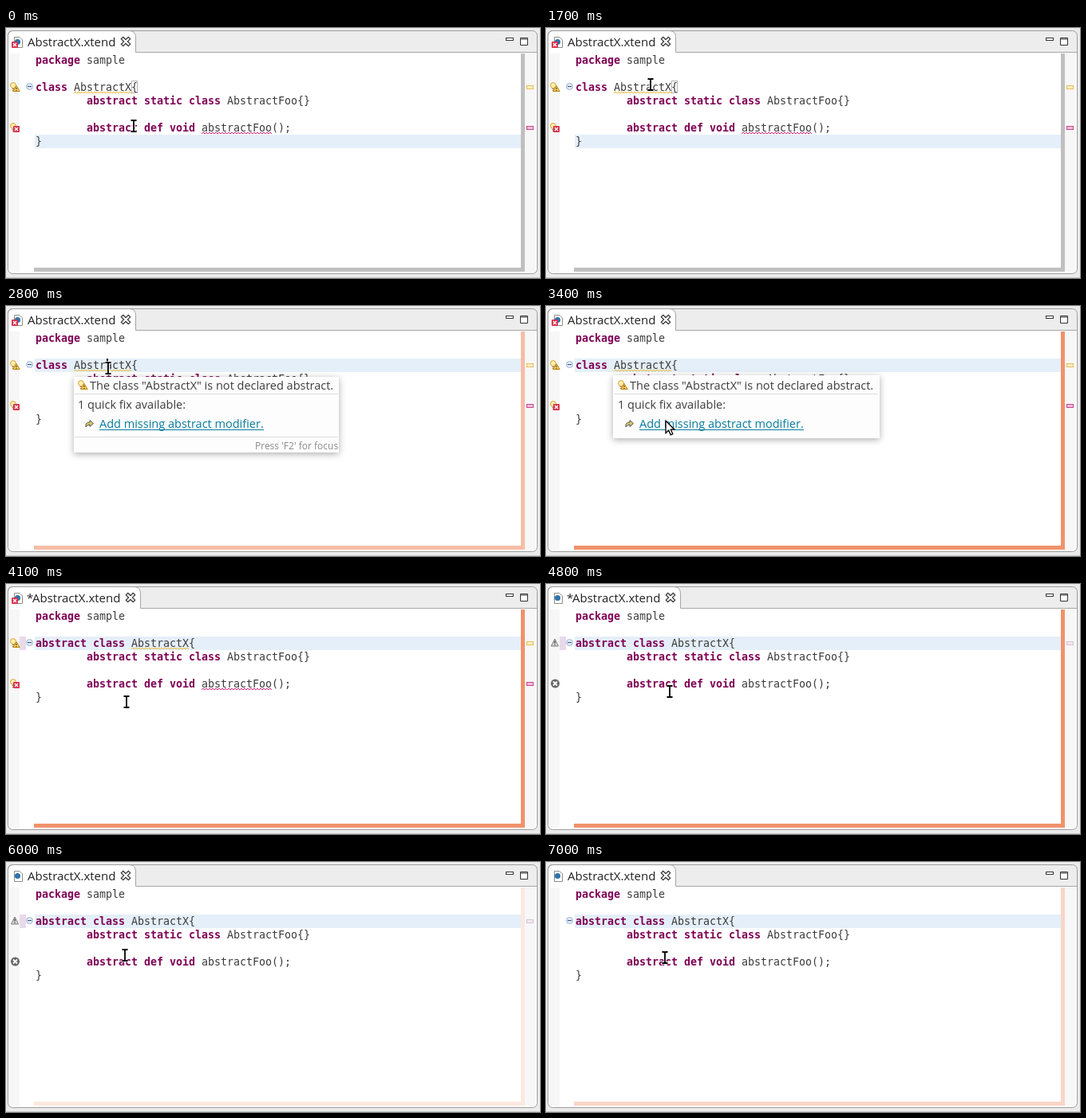
Write an HTML page that moves like this. It is 669 px wide and 314 px high and loops after 7100 ms.

```html
<!DOCTYPE html>
<html lang="en">
<head>
<meta charset="utf-8">
<title>Quick fix in an editor</title>
<style>
  html, body { margin: 0; width: 100%; height: 100%; overflow: hidden; background: #ebebeb; }
  svg { display: block; }
  text { white-space: pre; }
  .code { font: 13.29px "DejaVu Sans Mono", monospace; fill: #3c3c3c; }
  .key { font-weight: bold; fill: #7f0055; }
  .ui { font: 14.5px "Open Sans", "Noto Sans", sans-serif; fill: #3c3c3c; }
  .tab { font-size: 15px; fill: #222; }
  .foot { font-size: 12px; fill: #8a8a8a; }
  .link { fill: #077a9e; }
  .panel { fill: #fdfdfd; filter: drop-shadow(0 2px 4px rgba(0,0,0,.32)); }
</style>
</head>
<body>
<svg width="669" height="314" viewBox="0 0 669 314">
  <defs>
    <g id="bulb">
      <circle cx="4" cy="4" r="3.4" fill="#fff1b0" stroke="#d9a23c"/>
      <path d="M2.5 8.5h3M3 10.5h2" stroke="#8a7a52"/>
    </g>
    <g id="warnMark">
      <path d="M8 4.5L12.2 11.5H3.8Z" fill="#fbd04e" stroke="#b98218" stroke-linejoin="round"/>
      <path d="M8 6.8v2.2M8 10v1" stroke="#333"/>
    </g>
    <g id="errMark">
      <rect width="8" height="8" rx="1" fill="#d8304a"/>
      <path d="M2 2l4 4M6 2l-4 4" stroke="#fff" stroke-width="1.4"/>
    </g>
    <g id="warnBulb"><use href="#bulb"/><use href="#warnMark"/></g>
    <path id="ibeamPath" d="M-3.5-7H-1Q0-7 0-6Q0-7 1-7H3.5M0-6.5V6.5M-3.5 7H-1Q0 7 0 6Q0 7 1 7H3.5"/>
    <path id="crossPath" d="M-3.3-3.3L3.3 3.3M3.3-3.3L-3.3 3.3"/>
  </defs>

  <!-- window frame -->
  <path d="M0 313.5H669" stroke="#c9c9c9"/>
  <rect x="2.5" y="3.5" width="663" height="305" rx="6" fill="#ededed"/>
  <path d="M3 31H665V303Q665 308 660 308H8Q3 308 3 303Z" fill="#fff"/>
  <path id="tabShape" fill="#fff" stroke="#a5a5a5"/>
  <rect x="2.5" y="3.5" width="663" height="305" rx="6" fill="none" stroke="#9d9d9d"/>
  <path d="M5 32H17V306H8Q5 306 5 303Z" fill="#f7f7f7"/>
  <rect x="650" y="32" width="13" height="274" fill="#f7f7f7"/>
  <rect x="626.5" y="12.5" width="9" height="3" fill="#fff" stroke="#333"/>
  <path d="M644.5 12.5h9v9h-9zM644.5 14h9" fill="#fff" stroke="#333"/>

  <!-- tab -->
  <path d="M10.5 11.5H17L20.5 15V24.5H10.5Z" fill="#fff" stroke="#8d8d80"/>
  <circle cx="14.5" cy="17.5" r="3.6" fill="#2f74ab"/>
  <use id="tabErr" href="#errMark" x="7" y="17"/>
  <text id="star" class="ui tab" x="26" y="23">*</text>
  <text id="tabName" class="ui tab" y="23">AbstractX.xtend</text>
  <g id="close">
    <use href="#crossPath" stroke="#333" stroke-width="4.6" stroke-linecap="square"/>
    <use href="#crossPath" stroke="#fff" stroke-width="2.2" stroke-linecap="square"/>
  </g>

  <!-- editor -->
  <rect id="line" x="36" width="609" height="17" fill="#e5eff9"/>
  <rect id="diff" x="17" y="66" width="8" height="17" fill="#e8daea"/>
  <circle cx="29.5" cy="73.5" r="4" fill="#e1ebf6" stroke="#9db4d3"/>
  <path d="M27 73.5h5" stroke="#35527d"/>
  <g id="code"></g>
  <rect id="bracket" x="157.5" y="66.5" width="7" height="15" fill="none" stroke="#b5b5b5"/>
  <path id="warnWave" fill="none" stroke="#e9b93c"/>
  <path id="errWave" fill="none" stroke="#d9267a"/>
  <rect id="caret" y="66" width="2" height="17" fill="#000"/>

  <!-- rulers -->
  <g id="liveMarks">
    <use href="#warnBulb" x="5" y="68"/>
    <use href="#bulb" x="5" y="119"/>
    <use href="#errMark" x="9" y="123"/>
    <rect x="652.5" y="72.5" width="8" height="4" fill="#fdefbd" stroke="#e6bd5a"/>
    <rect x="652.5" y="123.5" width="8" height="4" fill="#f6b9da" stroke="#c94890"/>
  </g>
  <g id="staleMarks">
    <path d="M11 69L15.5 78H6.5Z" fill="#ddd" stroke="#777" stroke-linejoin="round"/>
    <path d="M11 71.5v3M11 75.5v1.2" stroke="#333" stroke-width="1.3"/>
    <circle cx="11.5" cy="125" r="5.5" fill="#666"/>
    <path d="M9 122.5l5 5M14 122.5l-5 5" stroke="#fff" stroke-width="1.8"/>
  </g>
  <rect id="diffMark" x="652.5" y="72.5" width="8" height="4" fill="#f4e8f1" stroke="#d9c2d6"/>
  <path id="bars" d="M645 32H650V306H35V301H645Z"/>

  <!-- hover popup -->
  <g id="popup">
    <rect id="panel" class="panel"/>
    <use href="#warnBulb" x="90" y="93"/>
    <text class="ui" x="105" y="105">The class "AbstractX" is not declared abstract.</text>
    <path d="M86 110.5H416" stroke="#dcdcdc"/>
    <text class="ui" x="90" y="129">1 quick fix available:</text>
    <path d="M100 152Q99 146 105 146V143.5L109.5 147.5L105 151.5V149Q102 149 100 152Z" fill="#d8c95e" stroke="#4d5266"/>
    <text class="ui link" x="117" y="153">Add missing abstract modifier.</text>
    <path d="M117 155.5H323" stroke="#077a9e"/>
    <g id="foot">
      <path d="M86 164.5H416" stroke="#dcdcdc"/>
      <text class="ui foot" x="312" y="180">Press 'F2' for focus</text>
    </g>
  </g>

  <!-- pointers -->
  <g id="ibeam" fill="none">
    <use href="#ibeamPath" stroke="#fff" stroke-width="3.6"/>
    <use href="#ibeamPath" stroke="#000" stroke-width="1.8"/>
  </g>
  <path id="arrow" d="M0 0V15.5L3.7 12.2L6.2 17.8L8.8 16.6L6.3 11.2H11Z" fill="#fff" stroke="#000" stroke-width="1.3"/>
</svg>
<script>
const LOOP = 7100, STEP = 100;
const $ = id => document.getElementById(id);
const show = (id, on) => $(id).setAttribute('visibility', on ? 'visible' : 'hidden');
const set = (id, attrs) => { for (const k in attrs) $(id).setAttribute(k, attrs[k]); };
const move = (id, x, y) => set(id, { transform: `translate(${x} ${y})` });

// rows of [time, ...values]; linear between rows
function sample(rows, t) {
  let i = rows.length - 1;
  while (i > 0 && rows[i][0] > t) i--;
  const a = rows[i], b = rows[i + 1];
  if (!b || t <= a[0]) return a.slice(1);
  const k = (t - a[0]) / (b[0] - a[0]);
  return a.slice(1).map((v, n) => v + (b[n + 1] - v) * k);
}

const POINTER = [
  [0, 160, 123], [500, 135, 79], [600, 135, 79], [800, 131, 71], [1700, 131, 71],
  [1900, 128, 78], [2800, 128, 78], [3200, 150, 144], [3400, 150, 144], [3500, 150, 150],
  [4000, 150, 150], [4800, 155, 135], [5400, 149, 117], [6400, 149, 117], [6600, 149, 120]
];
const BAR_LEVEL = [
  [2200, .2], [2400, .2], [3200, 1], [4800, 1], [5600, .2], [6700, .2], [7000, .38]
];

// words between * are keywords
function addCode(col, row, src, id) {
  const g = document.createElementNS('http://www.w3.org/2000/svg', 'g');
  if (id) g.id = id;
  src.split('*').forEach((part, i) => {
    if (part) {
      const el = document.createElementNS('http://www.w3.org/2000/svg', 'text');
      el.setAttribute('class', i % 2 ? 'code key' : 'code');
      el.setAttribute('x', 37 + col * 8);
      el.setAttribute('y', 45 + row * 17);
      el.textContent = part;
      g.append(el);
    }
    col += part.length;
  });
  $('code').append(g);
}
addCode(0, 0, '*package* sample');
addCode(0, 2, '*class* AbstractX{', 'plainClass');
addCode(0, 2, '*abstract class* AbstractX{', 'fixedClass');
addCode(8, 3, '*abstract static class* AbstractFoo{}');
addCode(8, 5, '*abstract def void* abstractFoo();');
addCode(0, 6, '}');

const wave = (x, y, w) => `M${x} ${y}` + 'l2 -2l2 2'.repeat(w / 4);
set('warnWave', { d: wave(85, 82, 72) });
set('errWave', { d: wave(245, 133, 88) });

function draw(now) {
  const t = Math.floor(now % LOOP / STEP) * STEP;
  const within = (a, b) => t >= a && t < b;
  const clicked = t >= 2100, fixed = t >= 3500, checked = t >= 4200;
  const dirty = within(3500, 5700);

  const edge = dirty ? 168.5 : 162.5;
  set('tabShape', { d: `M2.5 32V9.5Q2.5 3.5 8.5 3.5H${edge - 8}Q${edge} 3.5 ${edge} 12V30.5H665.5V32` });
  show('star', dirty);
  set('tabName', { x: dirty ? 33 : 27 });
  move('close', dirty ? 156 : 150, 17);
  show('tabErr', !checked);

  set('line', { y: clicked ? 66 : 134 });
  show('bracket', !clicked);
  show('plainClass', !fixed);
  show('fixedClass', fixed);
  show('warnWave', !checked);
  move('warnWave', fixed ? 72 : 0, 0);
  show('errWave', !checked);
  show('liveMarks', !checked);
  show('staleMarks', within(4200, 6500));
  show('diff', within(3500, 6500));
  show('diffMark', within(4200, 6500));
  show('caret', within(2100, 3000) || within(4900, 5700));
  set('caret', { x: fixed ? 157 : 126 });

  set('bars', clicked
    ? { fill: '#f0926c', opacity: sample(BAR_LEVEL, t)[0] }
    : { fill: '#bfbfbf', opacity: 1 });

  const entered = t >= 3200;
  show('popup', within(2500, 3500));
  show('foot', within(2500, 3200));
  set('panel', entered
    ? { x: 84, y: 87, width: 334, height: 79 }
    : { x: 85, y: 89, width: 332, height: 95 });

  const [x, y] = sample(POINTER, t);
  const overPopup = within(2900, 3500);
  show('ibeam', !overPopup);
  show('arrow', overPopup);
  move('ibeam', Math.round(x), Math.round(y));
  move('arrow', Math.round(x), Math.round(y));
}

const start = performance.now();
function tick() {
  draw(performance.now() - start);
  requestAnimationFrame(tick);
}
tick();
</script>
</body>
</html>
```
